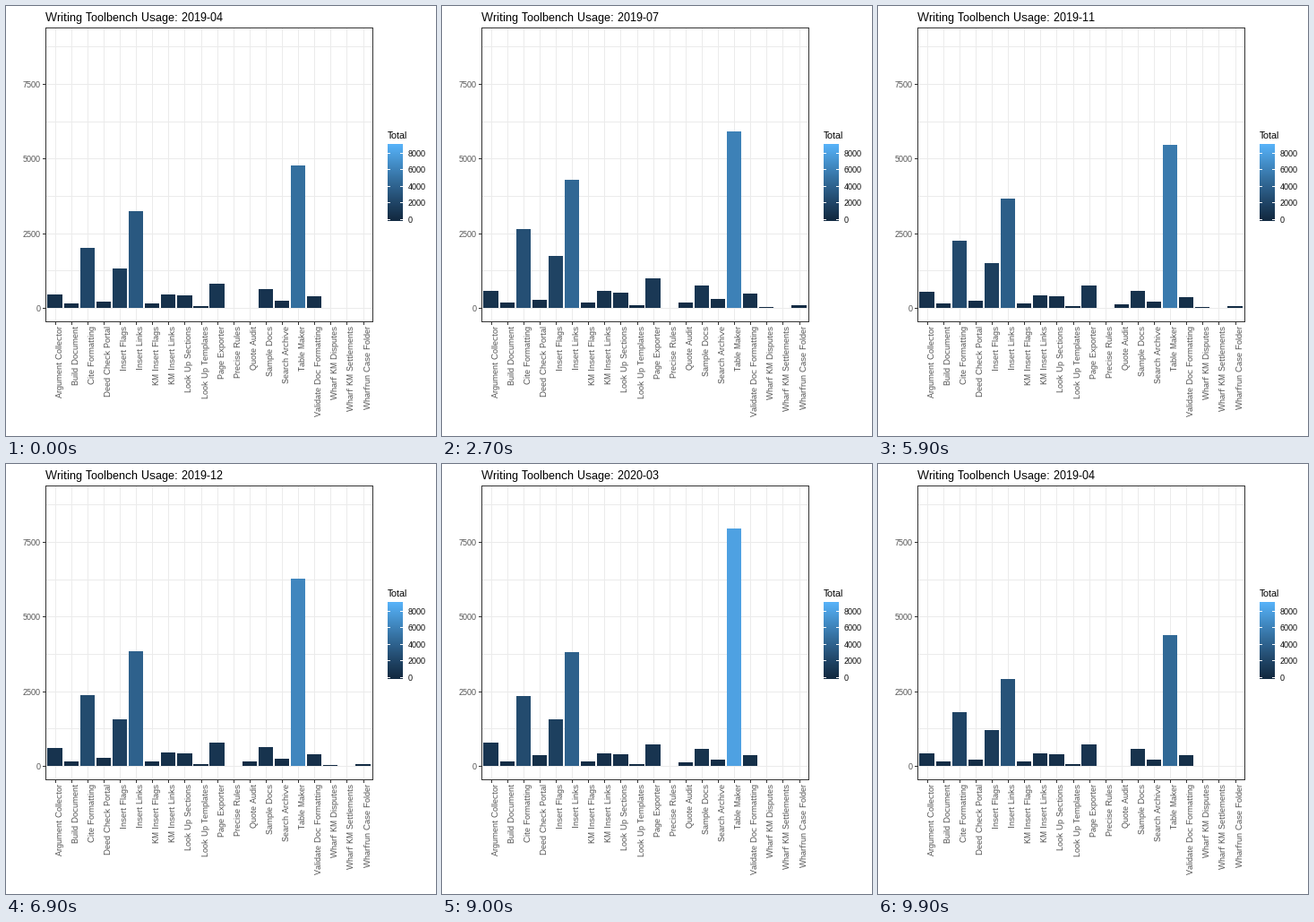
A matplotlib script for the animation above (10 s loop, 480 px wide and 480 px high).

```python
import math

import numpy as np
import matplotlib.pyplot as plt
from matplotlib.animation import FuncAnimation
from matplotlib.colors import LinearSegmentedColormap
from matplotlib.patches import Rectangle

plt.rcParams.update({
    "font.family": "Liberation Sans",
    "text.hinting": "native",
    "text.hinting_factor": 1,
})

SIZE = 480
LEFT, RIGHT, TOP, BOTTOM = 44, 409, 24, 352
FIRST_X, STEP_X, BAR_W = 54.6, 18.1, 16.3
ZERO_Y, UNITS_PER_PX = 337.7, 29.976
BASE_ROW = int(ZERO_Y)
MAX_TOTAL = 8945
INK, GRID, LABEL = "#333333", "#EBEBEB", "#4D4D4D"
BLUES = LinearSegmentedColormap.from_list(
    "blues", ["#132B43", "#22496C", "#326A98", "#438DC7", "#56B1F7"])

# Usage relative to the first month; the last month is incomplete.
MONTHS = 13
KEY_MONTHS = (0, 1, 5, 7, 10, 11, 12)
TRENDS = {
    "core": (1, 1.27, 1.37, 1.12, 1.24, 1.32, 0.30),
    "rising": (1, 1.22, 1.255, 1.134, 1.46, 1.87, 0.44),
    "minor": (1, 1.19, 1.21, 0.90, 1.03, 1.0, 0.25),
}

# Name, level, trend and, where limited, the first and last month of use.
TOOLS = [
    ("Argument Collector", 470, "rising"),
    ("Build Document", 160, "minor"),
    ("Cite Formatting", 2000, "core"),
    ("Deed Check Portal", 220, "rising"),
    ("Insert Flags", 1330, "core"),
    ("Insert Links", 3250, "core"),
    ("KM Insert Flags", 160, "minor"),
    ("KM Insert Links", 470, "minor"),
    ("Look Up Sections", 440, "minor"),
    ("Look Up Templates", 80, "minor"),
    ("Page Exporter", 820, "minor"),
    ("Precise Rules", 0, "minor"),
    ("Quote Audit", 150, "minor", 3, 12),
    ("Sample Docs", 640, "minor"),
    ("Search Archive", 250, "minor"),
    ("Table Maker", 4780, "rising"),
    ("Validate Doc Formatting", 400, "minor"),
    ("Wharf KM Disputes", 42, "minor", 3, 10),
    ("Wharf KM Settlements", 0, "minor"),
    ("Wharfrun Case Folder", 80, "minor", 1, 9),
]

HOLD = 3
STEPS = [5] * 10 + [4] * 3
FRAMES = 100


def monthly_totals(name, level, trend, first=0, last=MONTHS - 1):
    months = np.arange(MONTHS)
    totals = level * np.interp(months, KEY_MONTHS, TRENDS[trend])
    return np.where((months >= first) & (months <= last), totals, 0)


TOTALS = np.column_stack([monthly_totals(*tool) for tool in TOOLS])


def month_name(index):
    year, month = divmod(index % MONTHS + 3, 12)
    return f"{2019 + year}-{month + 1:02d}"


def state_at(frame):
    """Return the totals and the month in the title for one frame."""
    start = 0
    for month, steps in enumerate(STEPS):
        if frame < start + HOLD + steps:
            break
        start += HOLD + steps
    step = max(0, frame - start - HOLD + 1)
    before, after = TOTALS[month], TOTALS[(month + 1) % MONTHS]
    ease = (1 - math.cos(math.pi * step / steps)) / 2
    totals = before + (after - before) * ease
    if 0 < step < steps:  # bars without a partner are not tweened
        totals = np.where((before > 0) & (after > 0), totals, 0)
    return totals, month_name(month + (step > math.ceil(steps / 2)))


fig = plt.figure(figsize=(SIZE / 72, SIZE / 72), dpi=72, facecolor="white")
ax = fig.add_axes([0, 0, 1, 1])
ax.axis("off")


def box(x0, y0, x1, y1, color, z=1):
    patch = Rectangle((x0, y0), x1 - x0, y1 - y0, facecolor=color,
                      linewidth=0, antialiased=False, zorder=z)
    return ax.add_patch(patch)


def label(x, y, text, size=9, color="black", **style):
    return ax.text(x, y, text, size=size, color=color, va="baseline", **style)


def draw_panel(centers):
    for value in range(0, 9000, 1250):
        y = int(ZERO_Y - value / UNITS_PER_PX)
        box(LEFT, y, RIGHT, y + 1, GRID)
        if value % 2500 == 0:
            box(LEFT - 3, y, LEFT, y + 1, INK)
            label(39, y + 4, str(value), color=LABEL, ha="right")
    for x, tool in zip(centers, TOOLS):
        column = round(x)
        box(column, TOP, column + 1, BOTTOM, GRID)
        box(column, BOTTOM + 1, column + 1, BOTTOM + 4, INK)
        label(column + 8, 357, tool[0], color=LABEL, rotation=90,
              rotation_mode="anchor", ha="right")
    for y in (TOP, BOTTOM):
        box(LEFT, y, RIGHT + 1, y + 1, INK, 4)
    for x in (LEFT, RIGHT):
        box(x, TOP, x + 1, BOTTOM + 1, INK, 4)


def draw_legend():
    x0, x1, y0, y1 = 426, 443, 154, 240
    zero, span = 237.55, 82.1
    rows = np.arange(y0, y1) + 0.5
    shades = BLUES(np.clip((zero - rows) / span, 0, 1))
    ax.imshow(shades[:, None, :], extent=(x0, x1, y1, y0), aspect="auto",
              interpolation="nearest", zorder=2)
    label(426, 148, "Total", size=11)
    for value in range(0, 8001, 2000):
        y = round(zero - value / MAX_TOTAL * span)
        box(x0, y, x0 + 3, y + 1, "white", 3)
        box(x1 - 3, y, x1, y + 1, "white", 3)
        label(449, y + 4, str(value))


centers = FIRST_X + STEP_X * np.arange(len(TOOLS))
draw_panel(centers)
draw_legend()
ax.set_xlim(0, SIZE)
ax.set_ylim(SIZE, 0)
title = label(44, 17, "", size=13)
bars = [box(round(x - BAR_W / 2), BASE_ROW, round(x + BAR_W / 2), BASE_ROW,
            INK, 3) for x in centers]


def update(frame):
    totals, month = state_at(frame)
    title.set_text(f"Writing Toolbench Usage: {month}")
    for bar, total in zip(bars, totals):
        top = int(ZERO_Y - total / UNITS_PER_PX)
        bar.set_y(top)
        bar.set_height(BASE_ROW - top)
        bar.set_facecolor(BLUES(total / MAX_TOTAL))
        bar.set_visible(total > 0)
    return [title, *bars]


animation = FuncAnimation(fig, update, frames=FRAMES, interval=100,
                          repeat=True, repeat_delay=0)
plt.show()
```
